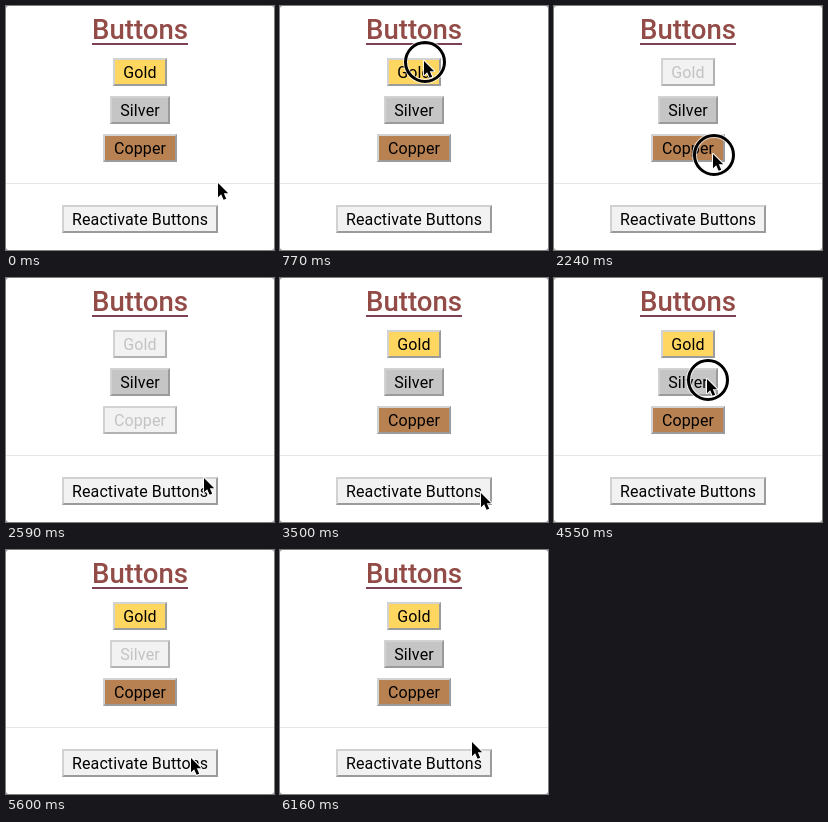
Animation of 268x244 px, one loop 6440 ms. Source, as an HTML page:

```html
<!DOCTYPE html>
<html lang="en">
<head>
<meta charset="utf-8">
<title>Buttons</title>
<style>
  html, body { margin: 0; width: 100%; height: 100%; overflow: hidden; background: #fff; }
  svg { display: block; width: 100%; height: 100%; }
  text { font-family: Roboto, "Liberation Sans", sans-serif; text-anchor: middle; }
  .label { font-size: 16px; letter-spacing: .12px; }
  .title { font-size: 27.6px; font-weight: 500; fill: #924b47; }
</style>
</head>
<body>
<svg viewBox="0 0 268 244">
  <rect width="268" height="244" fill="#999"/>
  <rect width="268" height="244" rx="3" fill="#fff"/>
  <text class="title" x="134" y="33">Buttons</text>
  <rect x="86" y="37" width="96" height="2" fill="#7d4156"/>
  <rect y="177" width="268" height="1" fill="#e6e6e6"/>
  <g id="buttons"></g>
  <g id="ring" fill="none">
    <circle r="19.5" stroke="#fff" stroke-opacity=".7" stroke-width="5"/>
    <circle r="19.5" stroke="#000" stroke-width="3"/>
  </g>
  <path id="cursor" d="M0 0V14.2L3.2 11.2 5.6 16.8 8.2 15.7 5.8 10.2H10.2Z"
    stroke="#fff" stroke-width="1.8" stroke-linejoin="round" paint-order="stroke"/>
</svg>
<script>
const LOOP = 6440, STEP = 70, RING = 140;
const LIGHT = '#d2d2d2', DARK = '#9b9b9b', PLAIN = '#f2f2f2';
const $ = id => document.getElementById(id);

// Cursor tip: time, x, y
const path = [
  [0, 212, 177], [350, 165, 105], [560, 147, 62], [700, 144, 55], [840, 144, 55],
  [980, 185, 64], [1120, 227, 100], [1260, 222, 130], [1400, 204, 146],
  [1540, 176, 148], [1750, 159, 148], [2310, 159, 148], [2450, 180, 174],
  [2590, 198, 200], [2730, 186, 221], [3220, 186, 221], [3500, 201, 215],
  [3640, 228, 172], [3710, 211, 133], [3850, 172, 106], [3990, 153, 101],
  [4620, 153, 101], [4830, 200, 115], [4970, 228, 145], [5180, 195, 199],
  [5600, 185, 208], [5810, 185, 208], [6160, 192, 192], [LOOP, 192, 192]
];

const clicks = [
  { at: 770, name: 'Gold' },
  { at: 2240, name: 'Copper' },
  { at: 3080, name: 'Reactivate Buttons' },
  { at: 4550, name: 'Silver' },
  { at: 5740, name: 'Reactivate Buttons' }
];

const buttons = [
  { name: 'Gold', x: 107, y: 52, w: 54, color: '#ffd65f' },
  { name: 'Silver', x: 104, y: 90, w: 60, color: '#c5c5c5' },
  { name: 'Copper', x: 97, y: 128, w: 74, color: '#b78152' },
  { name: 'Reactivate Buttons', x: 56, y: 199, w: 156, color: PLAIN }
];
const reset = buttons[3].name;

function add(parent, tag, attrs) {
  const el = document.createElementNS('http://www.w3.org/2000/svg', tag);
  for (const key in attrs) el.setAttribute(key, attrs[key]);
  return parent.appendChild(el);
}

for (const b of buttons) {
  const h = 28, { x, y, w } = b, g = $('buttons');
  b.low = add(g, 'rect', { x, y, width: w, height: h });
  b.high = add(g, 'path', { d: `M${x} ${y}h${w}l-2 2h${4 - w}v${h - 4}l-2 2z` });
  b.face = add(g, 'rect', { x: x + 2, y: y + 2, width: w - 4, height: h - 4 });
  b.text = add(g, 'text', { class: 'label', x: x + w / 2, y: y + 20 });
  b.text.textContent = b.name;
}

const slope = (i, axis) =>
  (path[i + 1][axis] - path[i][axis]) / (path[i + 1][0] - path[i][0]);

// Monotone tangents keep the cursor still during rests
function tangent(i, axis) {
  if (i === 0 || i === path.length - 1) return 0;
  const a = slope(i - 1, axis), b = slope(i, axis);
  return a * b > 0 ? 2 * a * b / (a + b) : 0;
}

function cursorAt(t) {
  let i = 0;
  while (i < path.length - 2 && path[i + 1][0] <= t) i++;
  const span = path[i + 1][0] - path[i][0], u = (t - path[i][0]) / span;
  return [1, 2].map(axis => {
    const p = path[i][axis], q = path[i + 1][axis];
    return p + (q - p) * u * u * (3 - 2 * u)
      + span * u * (1 - u) * ((1 - u) * tangent(i, axis) - u * tangent(i + 1, axis));
  });
}

function render(time) {
  const t = Math.floor(time % LOOP / STEP) * STEP;
  const [x, y] = cursorAt(t);
  const active = clicks.find(c => t >= c.at && t < c.at + RING);
  const disabled = new Set();
  for (const c of clicks) {
    if (t < c.at + RING) break;
    if (c.name === reset) disabled.clear();
    else disabled.add(c.name);
  }

  for (const b of buttons) {
    const off = disabled.has(b.name);
    const pressed = active && active.name === b.name && t >= active.at + STEP;
    b.face.setAttribute('fill', off ? PLAIN : b.color);
    b.text.setAttribute('fill', off ? '#c3c3c3' : '#000');
    b.high.setAttribute('fill', pressed ? DARK : LIGHT);
    b.low.setAttribute('fill', pressed ? LIGHT : off ? '#b2b2b2' : DARK);
  }

  $('cursor').setAttribute('transform', `translate(${x} ${y})`);
  $('ring').setAttribute('transform', `translate(${x + 1} ${y + 1})`);
  $('ring').setAttribute('visibility', active ? 'visible' : 'hidden');
}

const start = performance.now();
function tick() {
  render(performance.now() - start);
  requestAnimationFrame(tick);
}
tick();
</script>
</body>
</html>
```
